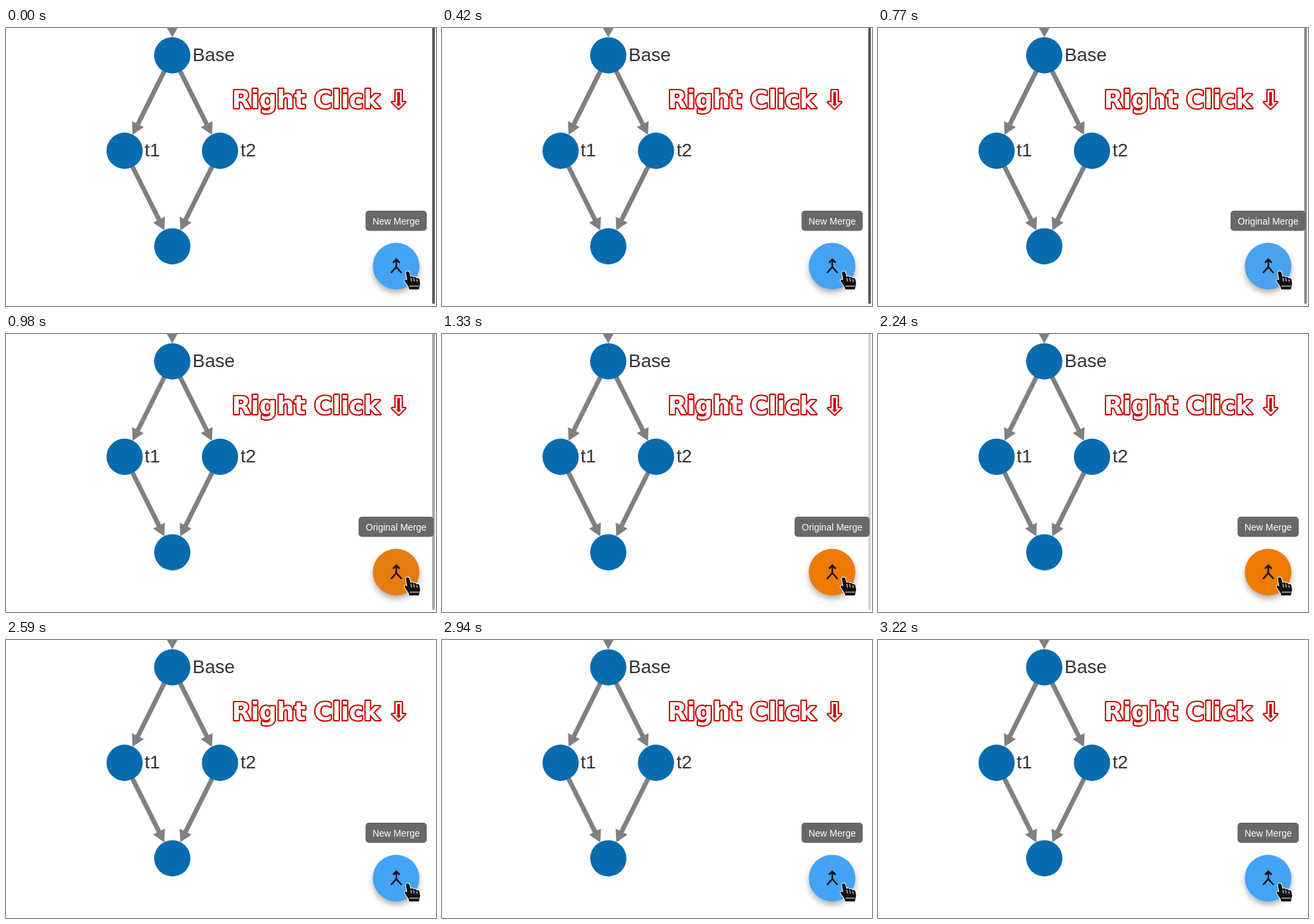
An HTML page for the animation above (3.29 s loop, 650 by 420 pixels).

```html
<!DOCTYPE html>
<html>
<head>
<meta charset="utf-8">
<style>
  html, body { margin: 0; width: 100%; height: 100%; overflow: hidden; background: #fff; }
  svg { display: block; width: 650px; height: 420px; }
  text { font-family: "Liberation Sans", Arial, sans-serif; }
  .label { font-size: 28px; fill: #333; }
  .tip { font-size: 14px; fill: #fff; text-anchor: middle; }
  .title {
    font: bold 37px "DejaVu Sans", sans-serif;
    fill: #fff; stroke: #c80000; stroke-width: 4px;
    stroke-linejoin: round; paint-order: stroke;
  }
</style>
</head>
<body>
<svg viewBox="0 0 650 420">
  <defs>
    <filter id="blur" x="-50%" y="-50%" width="200%" height="200%">
      <feGaussianBlur stdDeviation="5"/>
    </filter>
  </defs>
  <g id="edges" fill="#808080" stroke="#808080"></g>
  <g id="nodes" fill="#086bad"></g>
  <g class="label">
    <text x="282" y="50">Base</text>
    <text x="209.5" y="194">t1</text>
    <text x="354.5" y="194">t2</text>
  </g>
  <text class="title" x="341.5" y="121">Right Click ⇩</text>

  <rect id="bar" x="644.3" y="-4" width="4" height="421" rx="2" fill="#222"/>

  <rect id="tipBox" y="276" height="30.5" rx="5" fill="#686868"/>
  <text id="tipText" class="tip" x="589.7" y="297"></text>

  <circle cx="589.7" cy="365" r="35" opacity=".32" filter="url(#blur)"/>
  <circle id="button" cx="589.7" cy="359.7" r="35.2"/>
  <path d="M590 350V361L582 370M590 361L598 370M585 354.5L590 349.5L595 354.5"
        fill="none" stroke="#111" stroke-width="2.5"/>

  <!-- hand pointer -->
  <path d="M604.5 370Q604.5 367.5 607 367.5T610 370L611.5 376Q614 374 616 376.5
           Q619 375 620.5 378Q624 377 625 380L626 386L624 395H609.5L608.5 391
           L602.5 382.5Q602 379.5 605 380L606.5 381Z"
        fill="#111" stroke="#fff" stroke-width="2" paint-order="stroke"/>
  <path d="M612 377.5L613 383M616.5 378L617.2 383M621 379.5L621.5 383.5M610 390H624"
        fill="none" stroke="#fff" stroke-width="1"/>
</svg>
<script>
const $ = id => document.getElementById(id);
const LOOP = 3290;
const base = [251.3, 41.3], left = [179.3, 185.5], right = [323.5, 185.5], end = [251.4, 329.8];
const BLUE = [67, 163, 245], ORANGE = [238, 122, 2];

// Straight edge whose arrowhead touches the rim of the second node.
function edge([x1, y1], [x2, y2]) {
  const angle = Math.atan2(y2 - y1, x2 - x1) * 180 / Math.PI;
  const tip = Math.hypot(x2 - x1, y2 - y1) - 27;
  return `<g transform="translate(${x1} ${y1}) rotate(${angle})">
    <path d="M0 0H${tip - 16}" stroke-width="7"/>
    <path d="M${tip} 0l-18 -10v20z" stroke="none"/></g>`;
}

$('edges').innerHTML = [
  [[251.3, -100], base], [base, left], [base, right], [left, end], [right, end]
].map(([a, b]) => edge(a, b)).join('');
$('nodes').innerHTML = [base, left, right, end]
  .map(([x, y]) => `<circle cx="${x}" cy="${y}" r="27.4"/>`).join('');

const ramp = (t, from, to) => Math.min(1, Math.max(0, (t - from) / (to - from)));
const ease = p => p * p * (3 - 2 * p);

function draw(now) {
  const t = now % LOOP;
  const toggled = t >= 700 && t < 2170;
  const width = toggled ? 113.5 : 92.5;
  $('tipText').textContent = toggled ? 'Original Merge' : 'New Merge';
  $('tipBox').setAttribute('x', 589.7 - width / 2);
  $('tipBox').setAttribute('width', width);

  const mix = ease(ramp(t, 740, 1020)) - ease(ramp(t, 2240, 2520));
  const rgb = BLUE.map((c, i) => Math.round(c + (ORANGE[i] - c) * mix));
  $('button').setAttribute('fill', `rgb(${rgb})`);
  $('bar').setAttribute('opacity', 0.78 * (1 - ramp(t, 400, 1640)));
  requestAnimationFrame(draw);
}
requestAnimationFrame(draw);
</script>
</body>
</html>
```
